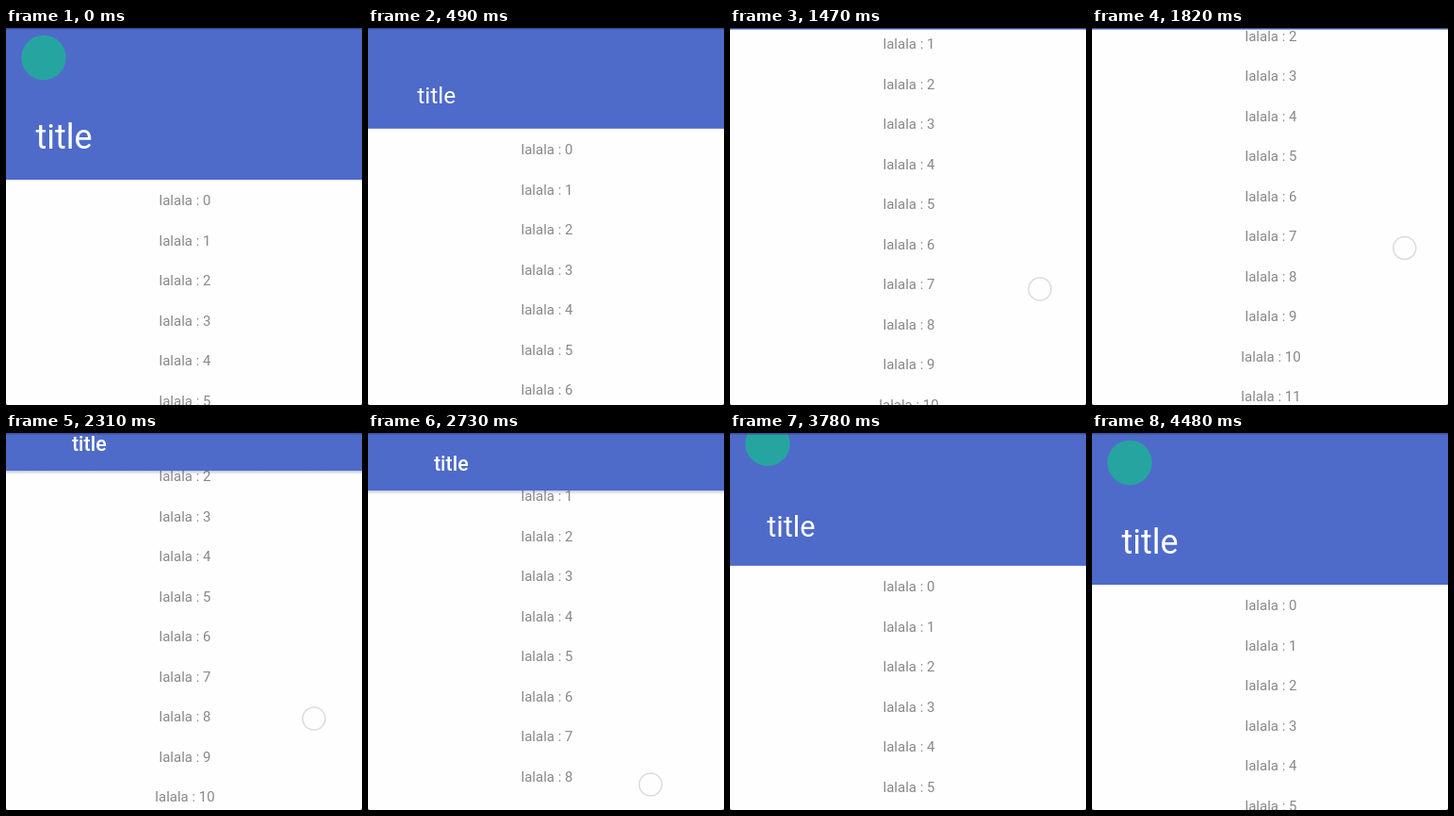
Write an HTML page with a canvas that moves like this. It is 378x400 px and loops after 4550 ms.

```html
<!DOCTYPE html>
<html lang="en">
<head>
<meta charset="utf-8">
<title>Collapsing header</title>
<style>
html, body { margin: 0; width: 100%; height: 100%; overflow: hidden; background: #555; }
canvas { display: block; width: 378px; height: 400px; border-radius: 2px; }
</style>
</head>
<body>
<canvas id="stage" width="378" height="400"></canvas>
<script>
const ctx = document.getElementById('stage').getContext('2d');
const W = 378, H = 400, LOOP = 4550, STEP = 70;
const FULL = 161, BAR = 61, ROW = 42.5, PAD = 22, MAX_SCROLL = 101;
const TURN = 2030; // the drag changes direction here

// [time, y of the first row]
const rowKeys = [[0, 183], [280, 157], [910, 62], [1470, -25.5], [1890, -79], [2100, -79],
  [2310, -39], [2730, 24.5], [3360, 103], [4060, 183], [LOOP, 183]];
// [time, x, y]
const fingerKeys = [[0, 290, 505], [910, 315, 374], [1470, 329, 277], [1890, 332, 231],
  [2030, 331.5, 230.5], [2310, 327, 303], [2730, 300, 373], [3100, 280, 425], [LOOP, 280, 600]];

const lerp = (a, b, p) => a + (b - a) * p;
const clamp = (v, lo, hi) => Math.min(hi, Math.max(lo, v));

// Smooth interpolation without overshoot
function track(keys, t, col = 1) {
  const slope = i => i < 0 || i > keys.length - 2 ? 0
    : (keys[i + 1][col] - keys[i][col]) / (keys[i + 1][0] - keys[i][0]);
  const tangent = i => {
    const a = slope(i - 1), b = slope(i);
    return a * b > 0 ? 2 * a * b / (a + b) : 0;
  };
  let i = 0;
  while (i < keys.length - 2 && t >= keys[i + 1][0]) i++;
  const a = keys[i], b = keys[i + 1], d = b[0] - a[0], p = (t - a[0]) / d, q = 1 - p;
  return a[col] * q * q * (1 + 2 * p) + b[col] * p * p * (3 - 2 * p)
    + d * p * q * (tangent(i) * q - tangent(i + 1) * p);
}

function circle(x, y, r) {
  ctx.beginPath();
  ctx.arc(x, y, r, 0, 2 * Math.PI);
}

function drawRows(top) {
  ctx.fillStyle = '#888';
  ctx.font = '15px Roboto, sans-serif';
  ctx.textAlign = 'center';
  for (let i = 0; i < 13; i++) ctx.fillText('lalala : ' + i, 190, top + i * ROW + 5.3);
}

function drawHeader(height, lifted) {
  if (lifted && height > 0) {
    const shade = ctx.createLinearGradient(0, height, 0, height + 4);
    shade.addColorStop(0, 'rgba(60,70,130,.3)');
    shade.addColorStop(1, 'rgba(60,70,130,0)');
    ctx.fillStyle = shade;
    ctx.fillRect(0, height, W, 4);
  }
  ctx.fillStyle = '#4e6bca';
  ctx.fillRect(0, 0, W, height);

  ctx.fillStyle = '#26a5a0';
  circle(40, 31.5 + height - FULL, 23.7);
  ctx.fill();

  const p = clamp((FULL - height) / (FULL - BAR), 0, 1);
  const size = lerp(36, 21.4, 1 - (1 - p) ** 2);
  ctx.fillStyle = '#fff';
  ctx.font = `${p === 1 ? 500 : 400} ${size}px Roboto, sans-serif`;
  ctx.textAlign = 'left';
  if (height > 0) ctx.fillText('title', lerp(31.5, 70, p), height - lerp(33.5, 21.5, p));

  ctx.fillStyle = '#3b509f';
  ctx.fillRect(0, 0, W, 1.5);
}

function draw(t) {
  const top = track(rowKeys, t);
  const rest = top - PAD;
  const pulled = t < TURN ? 0 : clamp(rest + MAX_SCROLL, 0, BAR);
  const height = clamp(Math.max(rest, pulled), 0, FULL);

  ctx.fillStyle = '#fefefe';
  ctx.fillRect(0, 0, W, H);
  drawRows(top);
  drawHeader(height, rest < height - 0.5);

  ctx.strokeStyle = '#dcdcdc';
  ctx.lineWidth = 1.6;
  circle(track(fingerKeys, t), track(fingerKeys, t, 2), 12);
  ctx.stroke();
}

const start = performance.now();
function frame() {
  const t = (performance.now() - start) % LOOP;
  draw(Math.floor(t / STEP) * STEP);
  requestAnimationFrame(frame);
}
frame();
</script>
</body>
</html>
```
